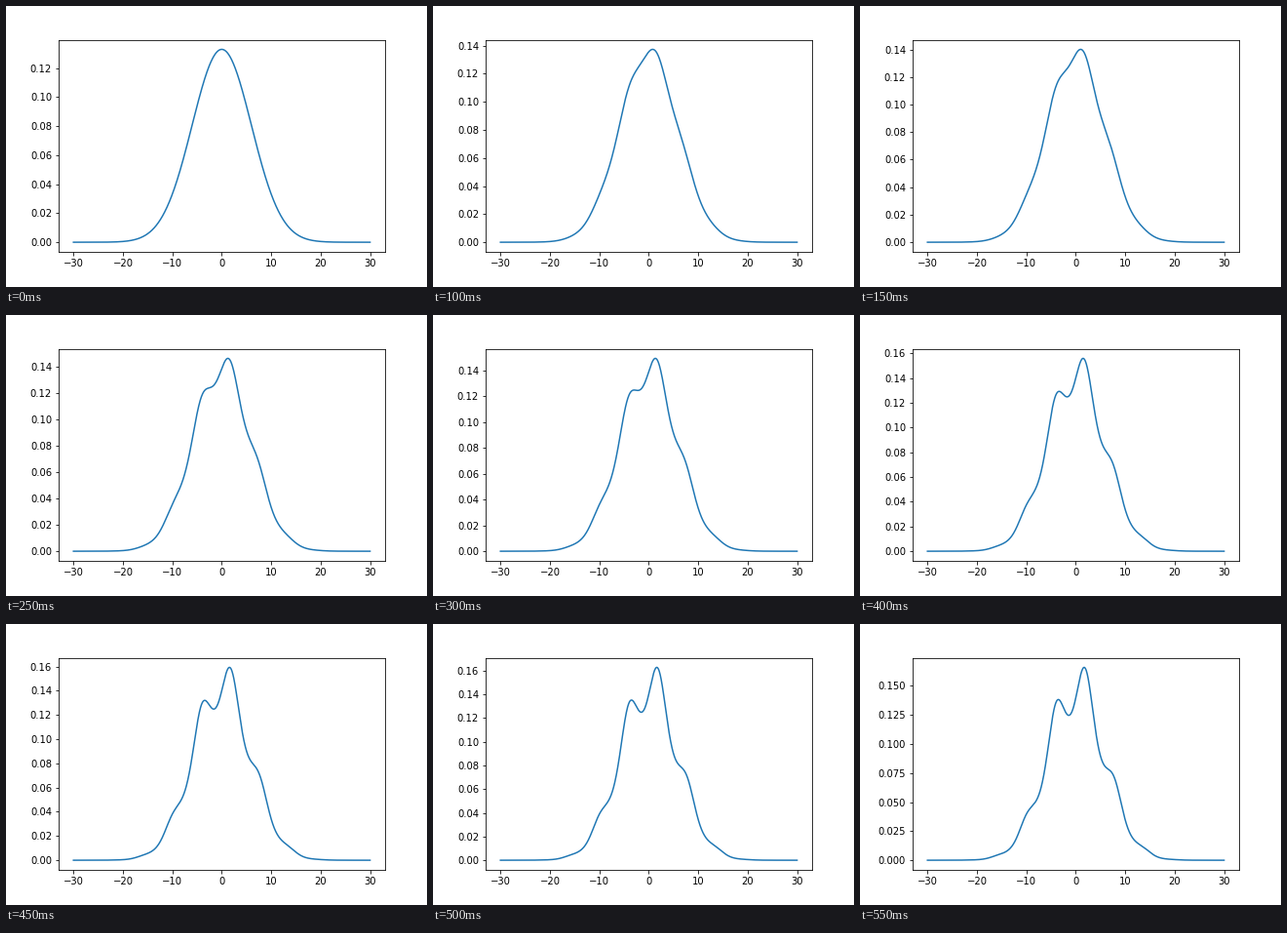
A matplotlib script for the animation above (600 ms loop, 432 by 288 pixels).

```python
import numpy as np
import matplotlib.pyplot as plt
from matplotlib.animation import FuncAnimation

FRAMES = 12
INTERVAL = 50
SIGMA = 6

plt.rcParams.update({"font.family": "DejaVu Sans", "font.size": 10})

x = np.linspace(-30, 30, 1000)
start = 2 / (SIGMA * np.sqrt(2 * np.pi)) * np.exp(-x**2 / (2 * SIGMA**2))
drift = (0.0105 + 0.00018 * x) * np.exp(-x**2 / 144)


def density(step):
    """Gaussian multiplied by a growing ripple whose phase slides right."""
    phase = 1.6 + 0.02 * step + 0.0016 * step**2
    t = step * (1.04 - 0.004 * step)
    return start * np.exp(t * (drift + 0.014 * np.cos(x - phase)))


fig, ax = plt.subplots(figsize=(6, 4), dpi=72)
fig.subplots_adjust(left=0.125, right=0.9, bottom=0.125, top=0.88)
line, = ax.plot(x, density(0), color="#1f77b4", lw=1.5)


def update(step):
    line.set_ydata(density(step))
    ax.relim()
    ax.autoscale_view()
    return line,


anim = FuncAnimation(fig, update, frames=FRAMES, interval=INTERVAL,
                     init_func=lambda: update(0), repeat=True, repeat_delay=0)
plt.show()
```
